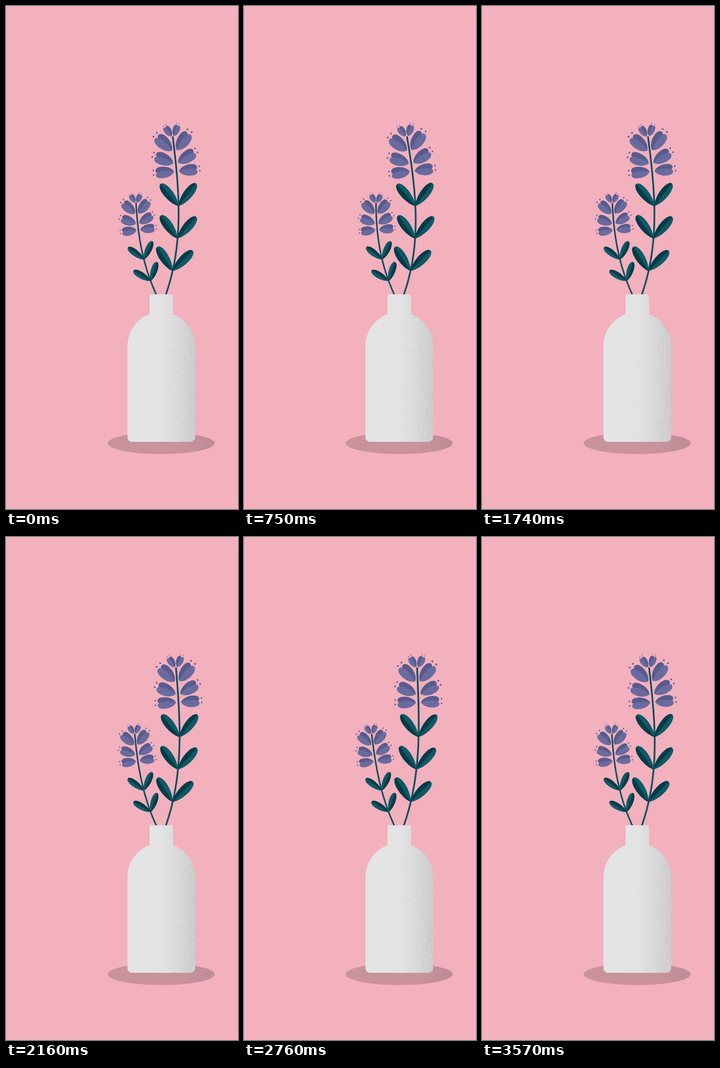
Recreate the animation shown at these times as an HTML page with a canvas. Size 509x1101 px, loop 3.6 s.

```html
<!DOCTYPE html>
<html lang="en">
<head>
<meta charset="utf-8">
<title>Lavender in a bottle</title>
<style>
  html, body { margin: 0; width: 100%; height: 100%; overflow: hidden; background: #f3b0bd; }
  canvas { display: block; }
</style>
</head>
<body>
<canvas id="stage" width="509" height="1101"></canvas>
<script>
const W = 509, H = 1101, LOOP = 3600, STEP = 30, BASE = 632;
const ctx = document.getElementById('stage').getContext('2d');

// stem: x of the four evenly spaced Bezier points from base to tip.
// node: height of the top leaf pair; lean: how far leaves follow the stem's tilt.
const tall = {
  stem: [350.5, 391, 380, 366], top: 287, width: 3.8, power: 2, size: 1,
  node: 438, gap: 71, pairs: 3, leaf: 62.5, lean: .5, mirror: 1,
  sway: a => 1.2 - 11.2 * Math.cos(a) + 1.5 * Math.cos(2 * a)
};
const short = {
  stem: [330, 299, 289, 285.3], top: 432, width: 3.4, power: 2.5, size: .78,
  node: 555, gap: 47, pairs: 2, leaf: 44, lean: 1, mirror: -1,
  sway: a => -.1 + 4.8 * Math.cos(a) - .2 * Math.cos(2 * a)
};

// Unit shapes along +x; the negative-y half is the dark one.
const heart = new Path2D(
  'M0 0C.12-.24.5-.35.8-.29C1-.24 1.02-.07 .9 0C1.02.07 1 .24.8.29C.5.35.12.24 0 0Z');
const heartShade = new Path2D('M0 0C.12-.24.5-.35.8-.29C1-.24 1.02-.07 .9 0Q.5-.16 0 0Z');
const leaf = new Path2D(
  'M0 0C.25-.18.8-.22.97-.07Q1-.04 1 0Q1 .04.97.07C.8.22.25.18 0 0Z');
const leafShade = new Path2D('M0 0C.25-.18.8-.22.97-.07Q1-.04 1 0Z');

function fill(c, path, color) {
  c.fillStyle = color;
  c.fill(path);
}

function dot(c, x, y, r) {
  c.beginPath();
  c.arc(x, y, r, 0, 7);
  c.fill();
}

function drawPetal() {
  fill(ctx, heart, '#696b9f');
  fill(ctx, heartShade, '#595b8c');
  for (const side of [-1, 1]) dot(ctx, 1.1, side * .12 - .02, .043);
}

function drawLeaf() {
  fill(ctx, leaf, '#0f5966');
  fill(ctx, leafShade, '#053c47');
}

function drawPlant(plant, bend) {
  const { stem: [a, b, c, d], top, power, size } = plant, height = BASE - top;

  function stemX(y) {
    const t = (BASE - y) / height, u = 1 - t;
    return u ** 3 * a + 3 * u * u * t * b + 3 * u * t * t * c + t ** 3 * d + bend * t ** power;
  }
  const tilt = y => Math.atan((stemX(y - 1) - stemX(y + 1)) / 2);

  // A mirrored pair of parts growing out of the stem; angle is measured from its direction.
  function pair(y, angle, len, gap, lean, mirror, draw) {
    for (const side of [-1, 1]) {
      ctx.save();
      ctx.translate(stemX(y), y);
      ctx.rotate(tilt(y) * lean);
      ctx.translate(side * gap, 0);
      ctx.rotate((side * angle - 90) * Math.PI / 180);
      ctx.scale(len, len * (mirror ?? side));
      draw();
      ctx.restore();
    }
  }

  [-2, 29, 57, 75].forEach((drop, i) => {
    const len = i ? 48.5 - 2.4 * i : 25.5, gap = i ? 5.5 : 3;
    pair(top + drop * size, 26 + 12 * i + 3 * i * i, len * size, gap * size, 1, null, drawPetal);
  });

  ctx.beginPath();
  for (let y = BASE; y >= top; y -= 5) ctx.lineTo(stemX(y), y);
  ctx.strokeStyle = '#0f505d';
  ctx.lineWidth = plant.width;
  ctx.lineCap = ctx.lineJoin = 'round';
  ctx.stroke();

  for (let i = 0; i < plant.pairs; i++) {
    pair(plant.node + i * plant.gap, 38.5, plant.leaf, 0, plant.lean, plant.mirror, drawLeaf);
  }
}

function random(seed) {
  return () => (seed = (seed * 16807) % 2147483647) / 2147483647;
}

function ramp(c, x0, x1, ...colors) {
  const g = c.createLinearGradient(x0, 0, x1, 0);
  colors.forEach((color, i) => g.addColorStop(i / (colors.length - 1), color));
  return g;
}

// Specks that grow denser towards the right edge of the clip shape.
function grain(c, path, [x, y, w, h], count, colors) {
  const rnd = random(77);
  c.save();
  c.clip(path);
  for (let i = 0; i < count; i++) {
    c.fillStyle = colors[i % colors.length];
    c.fillRect(x + w * Math.sqrt(rnd()), y + h * rnd(), 1, 1);
  }
  c.restore();
}

function makeBottle() {
  const layer = document.createElement('canvas');
  layer.width = W;
  layer.height = H;
  const c = layer.getContext('2d');

  const shadow = new Path2D();
  shadow.ellipse(340.5, 957, 117.5, 23.7, 0, 0, 7);
  fill(c, shadow, ramp(c, 223, 458, '#c9939c', '#c9939c', '#c9939c', '#bf8d96'));
  grain(c, shadow, [380, 930, 78, 52], 700, ['rgba(150,105,115,.25)', 'rgba(225,165,175,.2)']);

  const glass = new Path2D();
  glass.roundRect(315, 631, 51.5, 60, [4, 4, 0, 0]);
  glass.roundRect(266.5, 670, 148.5, 284, [74, 74, 10, 10]);
  fill(c, glass, ramp(c, 266, 415, '#e4e4e4', '#e4e4e4', '#e3e3e3', '#dbdbdb', '#cdcdcd'));
  grain(c, glass, [335, 631, 80, 323], 7000, ['rgba(150,150,150,.2)', 'rgba(240,240,240,.25)']);
  return layer;
}

const bottle = makeBottle();
const start = performance.now();

function frame() {
  const t = Math.floor((performance.now() - start) % LOOP / STEP) * STEP;
  const angle = (t - 915) / LOOP * 2 * Math.PI;
  ctx.fillStyle = '#f3b0bd';
  ctx.fillRect(0, 0, W, H);
  for (const plant of [tall, short]) drawPlant(plant, plant.sway(angle));
  ctx.drawImage(bottle, 0, 0);
  requestAnimationFrame(frame);
}
frame();
</script>
</body>
</html>
```
